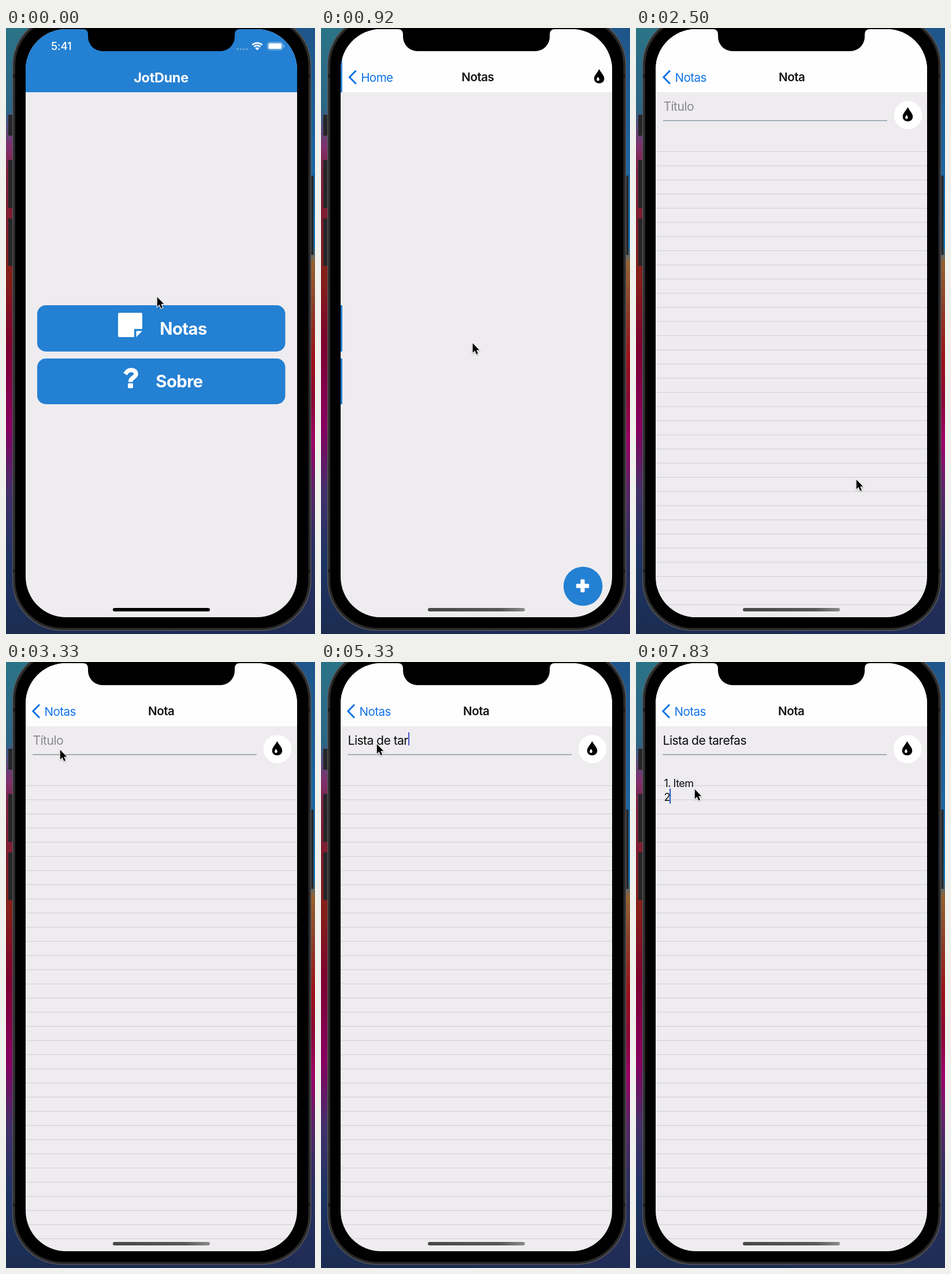
Recreate the animation shown at these times as an HTML page with a canvas. Size 535 px wide and 1047 px high, loop 8000 ms.

```html
<!DOCTYPE html>
<html lang="pt">
<head>
<meta charset="utf-8">
<title>Notas</title>
<style>
html, body { margin: 0; width: 100%; height: 100%; overflow: hidden; background: #000; }
canvas { display: block; width: 100vw; height: 100vh; }
</style>
</head>
<body>
<canvas id="stage" width="535" height="1047"></canvas>
<script>
const ctx = document.getElementById('stage').getContext('2d');
const W = 535, H = 1047, LOOP = 8000, STEP = 1000 / 12;
const SCREEN = { x: 34, y: 2, w: 470, h: 1016, r: 70 };
const BLUE = [36, 128, 210], PAPER = [238, 236, 239], WHITE = [255, 255, 255];
const LINK = '#1173e6';

const PUSH_NOTES = 517, PUSH_NOTE = 2040;
const CURSOR = [
  [0, 261, 464], [80, 261, 464], [300, 247, 513], [750, 247, 513],
  [1650, 463, 959], [2150, 463, 959], [3200, 93, 151], [3420, 93, 151],
  [3670, 96, 141], [5980, 96, 141], [6160, 101, 220], [6420, 101, 220],
  [6580, 101, 219], [8000, 101, 219]
];
const TITLE = 'Lista de tarefas';
const TITLE_KEYS = [3830, 3920, 4000, 4080, 4250, 4330, 4580, 4670, 4830,
  5170, 5250, 5330, 5420, 5580, 5670, 5830];
const BODY = '1. Item\n2';
const BODY_KEYS = [6500, 6750, 6830, 6920, 7000, 7080, 7170, 7500, 7830];
const TITLE_FOCUS = 3670, BODY_FOCUS = 6160;

const clamp = v => Math.max(0, Math.min(1, v));
const easeInOut = u => u < .5 ? 2 * u * u : 1 - 2 * (1 - u) ** 2;
const rgb = c => `rgb(${c.map(Math.round)})`;
const mix = (a, b, k) => a.map((v, i) => v + (b[i] - v) * k);
const faded = (color, alpha) => rgb(mix(PAPER, color, alpha));

// Critically damped spring
function spring(ms) {
  if (ms <= 0) return 0;
  const x = 18.26 * ms / 1000;
  const p = 1 - Math.exp(-x) * (1 + x);
  return p > .999 ? 1 : p;
}

function pressAlpha(t, down, up) {
  const on = easeInOut(clamp((t - down) / 150));
  const off = easeInOut(clamp((t - up) / 250));
  return 1 - .8 * on + .8 * off;
}

function rect(x, y, w, h, color) {
  ctx.fillStyle = color;
  ctx.fillRect(x, y, w, h);
}

function round(x, y, w, h, r, color) {
  ctx.beginPath();
  ctx.roundRect(x, y, w, h, r);
  ctx.fillStyle = color;
  ctx.fill();
}

function disc(x, y, r, color) {
  ctx.beginPath();
  ctx.arc(x, y, r, 0, Math.PI * 2);
  ctx.fillStyle = color;
  ctx.fill();
}

function setFont(size, weight, spacing) {
  ctx.font = `${weight} ${size}px Inter, sans-serif`;
  ctx.letterSpacing = `${spacing * size}px`;
}

function text(str, x, y, size, color, { weight = 400, align = 'left', spacing = -.028 } = {}) {
  setFont(size, weight, spacing);
  ctx.textAlign = align;
  ctx.fillStyle = color;
  ctx.fillText(str, x, y);
  return ctx.measureText(str).width;
}

function vertical(stops) {
  const g = ctx.createLinearGradient(0, 0, 0, H);
  stops.forEach(([y, c]) => g.addColorStop(y / H, c));
  return g;
}

function drawBackdrop() {
  rect(0, 0, W / 2, H, vertical([[0, '#2b7387'], [140, '#2d6686'], [205, '#80306e'],
    [245, '#7c2343'], [340, '#801c2c'], [430, '#842018'], [550, '#7c0230'],
    [690, '#860060'], [800, '#43306a'], [920, '#1d3564'], [H, '#1b2c50']]));
  rect(W / 2, 0, W / 2, H, vertical([[0, '#1f5589'], [250, '#1b67a4'], [375, '#1076ba'],
    [405, '#96622f'], [480, '#8d4029'], [570, '#9c1119'], [640, '#8c0833'],
    [715, '#9d0069'], [800, '#582568'], [900, '#2a3060'], [H, '#1f2c55']]));
  [[150, 36], [228, 83], [329, 82]].forEach(([y, h]) => rect(4, y, 8, h, '#262628'));
  rect(527, 255, 5.5, 137, '#262628');
  round(11, -22, 517.5, 1063.5, 86, '#5b5b5d');
  round(12.3, -20.7, 514.9, 1060.9, 85, '#2a2a2c');
  [80, 935].forEach(y => {
    rect(12, y, 5, 6, '#1b1b1c');
    rect(522, y, 5, 6, '#1b1b1c');
  });
  round(16, -17, 507.5, 1053.5, 82, '#000');
}

function drawChevron() {
  ctx.beginPath();
  ctx.moveTo(58, 73.5);
  ctx.lineTo(46.8, 85);
  ctx.lineTo(58, 96.5);
  ctx.strokeStyle = LINK;
  ctx.lineWidth = 3;
  ctx.stroke();
}

function dropPath(x, top, w, h) {
  ctx.beginPath();
  ctx.moveTo(x, top);
  ctx.bezierCurveTo(x + w * .18, top + h * .27, x + w / 2, top + h * .43, x + w / 2, top + h * .67);
  ctx.bezierCurveTo(x + w / 2, top + h * 1.11, x - w / 2, top + h * 1.11, x - w / 2, top + h * .67);
  ctx.bezierCurveTo(x - w / 2, top + h * .43, x - w * .18, top + h * .27, x, top);
  ctx.fill();
}

function drawDrop(x, top) {
  ctx.fillStyle = '#000';
  dropPath(x, top, 17.5, 24.5);
  ctx.fillStyle = '#fff';
  dropPath(x - 2, top + 13, 4.6, 7.5);
}

function drawNoteIcon(color, gap) {
  ctx.fillStyle = color;
  ctx.beginPath();
  ctx.roundRect(194, 492, 42, 42, 2.5);
  ctx.fill();
  rect(222, 520, 14.5, 14.5, gap);
  ctx.fillStyle = color;
  ctx.beginPath();
  ctx.moveTo(225.5, 523.5);
  ctx.lineTo(236, 523.5);
  ctx.lineTo(225.5, 534);
  ctx.fill();
}

function drawQuestion() {
  ctx.beginPath();
  ctx.moveTo(206.5, 598);
  ctx.quadraticCurveTo(210.5, 591, 216.5, 591);
  ctx.bezierCurveTo(222, 591, 225, 594, 225, 597.8);
  ctx.bezierCurveTo(225, 604, 215.5, 603.5, 215.5, 611.5);
  ctx.strokeStyle = '#fff';
  ctx.lineWidth = 7.6;
  ctx.stroke();
  round(211, 613.8, 9, 8.4, 1.5, '#fff');
}

function drawPaper(header) {
  rect(34, 0, 470, H, rgb(PAPER));
  rect(34, 0, 470, 111, header);
}

function drawHome(t) {
  drawPaper(rgb(BLUE));
  text('JotDune', 268.5, 94, 23.5, '#fff', { weight: 700, align: 'center', spacing: -.015 });
  const alpha = pressAlpha(t, 290, 483);
  const fill = faded(BLUE, alpha), ink = faded(WHITE, alpha);
  const label = { weight: 700, align: 'center', spacing: -.02 };
  round(54, 479, 429.5, 80, 15, fill);
  drawNoteIcon(ink, fill);
  text('Notas', 307, 530, 29.3, ink, label);
  round(54, 571, 429.5, 79, 15, rgb(BLUE));
  drawQuestion();
  text('Sobre', 300, 621, 29.3, '#fff', label);
}

function drawNavBar(back, title) {
  drawPaper('#fefeff');
  drawChevron();
  text(back, 66.5, 92.7, 20.6, LINK);
  text(title, 268.7, 92.2, 20.6, '#141416', { weight: 600, align: 'center', spacing: -.025 });
}

function drawNotes(t) {
  drawNavBar('Home', 'Notas');
  drawDrop(479, 71);
  const alpha = pressAlpha(t, 1798, 1990);
  disc(451, 964.5, 33.8, faded(BLUE, alpha));
  const ink = faded(WHITE, alpha);
  round(439, 960.2, 22.5, 7.2, 1.5, ink);
  round(446.7, 952.5, 7.2, 22.5, 1.5, ink);
}

const typed = (str, keys, t) => str.slice(0, keys.filter(k => k <= t + 5).length);

function drawNote(t) {
  drawNavBar('Notas', 'Nota');
  for (let i = 0; i < 33; i++) rect(34, 213 + i * 24.47, 470, 1, '#d0ced2');
  rect(46, 159.3, 388, 1.4, '#8496a2');
  disc(470, 150.5, 24.3, '#fff');
  drawDrop(469.5, 136.8);

  const title = typed(TITLE, TITLE_KEYS, t);
  if (!title) text('Título', 46.5, 143, 21.2, '#8a8990');
  const titleEnd = 46.5 + text(title, 46.5, 143, 21.2, '#0c0c0e');
  if (t >= TITLE_FOCUS && t < BODY_FOCUS) rect(titleEnd + .3, 121.5, 2, 22.5, '#4a50c6');

  const lines = typed(BODY, BODY_KEYS, t).split('\n');
  let end = 0;
  lines.forEach((line, i) => {
    end = text(line, 48.5, 215.7 + i * 24.2, 18, '#0c0c0e');
  });
  if (t >= BODY_FOCUS) rect(47.5 + end, 194 + (lines.length - 1) * 24.7, 2.2, 26, '#2f64c8');
}

function page(dx, left, draw) {
  ctx.save();
  ctx.beginPath();
  ctx.rect(34 + left, 0, 470, H);
  ctx.clip();
  ctx.translate(dx, 0);
  draw();
  ctx.restore();
}

function drawPages(t) {
  const a = spring(t - PUSH_NOTES), b = spring(t - PUSH_NOTE);
  const w = SCREEN.w, drift = -.3 * w;
  if (a < 1) page(a * drift, 0, () => drawHome(t));
  if (a > 0 && b < 1) {
    const x = (1 - a) * w + b * drift;
    page(x, x, () => drawNotes(t));
  }
  if (b > 0) page((1 - b) * w, (1 - b) * w, () => drawNote(t));
}

function drawStatus() {
  text('5:41', 78, 38, 18.6, '#fff', { weight: 500, spacing: -.01 });
  [401, 406.3, 411.6, 416.9].forEach(x => disc(x, 36.5, 1.8, 'rgba(255,255,255,.3)'));
  ctx.strokeStyle = '#fff';
  ctx.lineWidth = 2.7;
  [12.2, 7.8].forEach(r => {
    ctx.beginPath();
    ctx.arc(435, 38, r, -Math.PI * .75, -Math.PI * .25);
    ctx.stroke();
  });
  ctx.beginPath();
  ctx.moveTo(435, 38.5);
  ctx.arc(435, 38.5, 5, -Math.PI * .75, -Math.PI * .25);
  ctx.fillStyle = '#fff';
  ctx.fill();
  ctx.beginPath();
  ctx.roundRect(452.5, 24.5, 26.5, 13.5, 4);
  ctx.strokeStyle = 'rgba(255,255,255,.5)';
  ctx.lineWidth = 1.1;
  ctx.stroke();
  round(454.3, 26.3, 23, 10, 2.5, '#fff');
  round(480.3, 29, 1.6, 4.6, 1, 'rgba(255,255,255,.5)');
}

function drawNotch() {
  ctx.beginPath();
  ctx.moveTo(133, 0);
  ctx.lineTo(133, 2);
  ctx.quadraticCurveTo(142, 2, 142, 11);
  ctx.arcTo(142, 40, 170, 40, 25);
  ctx.arcTo(396, 40, 396, 11, 25);
  ctx.lineTo(396, 11);
  ctx.quadraticCurveTo(396, 2, 405, 2);
  ctx.lineTo(405, 0);
  ctx.fillStyle = '#000';
  ctx.fill();
}

function drawHomeBar(t) {
  let color = '#000';
  if (t > PUSH_NOTES) {
    color = ctx.createLinearGradient(185, 0, 353, 0);
    color.addColorStop(0, '#484848');
    color.addColorStop(.75, '#585858');
    color.addColorStop(1, '#8c8c8c');
  }
  round(185, 1002, 168, 6, 3, color);
}

function cursorAt(t) {
  const i = Math.max(1, CURSOR.findIndex(k => k[0] > t));
  const [t0, x0, y0] = CURSOR[i - 1], [t1, x1, y1] = CURSOR[i];
  const k = easeInOut(clamp((t - t0) / (t1 - t0)));
  return [x0 + (x1 - x0) * k, y0 + (y1 - y0) * k];
}

function drawCursor(t) {
  const [x, y] = cursorAt(t);
  ctx.save();
  ctx.translate(x + .8, y + .8);
  ctx.beginPath();
  [[0, 0], [0, 16.6], [3.8, 13], [6.6, 19.4], [9.3, 18.2], [6.5, 12], [11.6, 12]]
    .forEach(p => ctx.lineTo(...p));
  ctx.closePath();
  ctx.shadowColor = 'rgba(0,0,0,.3)';
  ctx.shadowBlur = 2;
  ctx.shadowOffsetY = 1;
  ctx.strokeStyle = '#fff';
  ctx.lineWidth = 2.2;
  ctx.stroke();
  ctx.shadowColor = 'transparent';
  ctx.fillStyle = '#000';
  ctx.fill();
  ctx.restore();
}

function draw(t) {
  drawBackdrop();
  ctx.save();
  ctx.beginPath();
  ctx.roundRect(SCREEN.x, SCREEN.y, SCREEN.w, SCREEN.h, SCREEN.r);
  ctx.clip();
  drawPages(t);
  drawStatus();
  drawHomeBar(t);
  ctx.restore();
  drawNotch();
  drawCursor(t);
}

const start = performance.now();
function tick() {
  const t = (performance.now() - start) % LOOP;
  // The screen refreshes twelve times a second
  draw(Math.min(95, Math.floor((t + 5) / STEP)) * STEP);
  requestAnimationFrame(tick);
}
tick();
</script>
</body>
</html>
```
